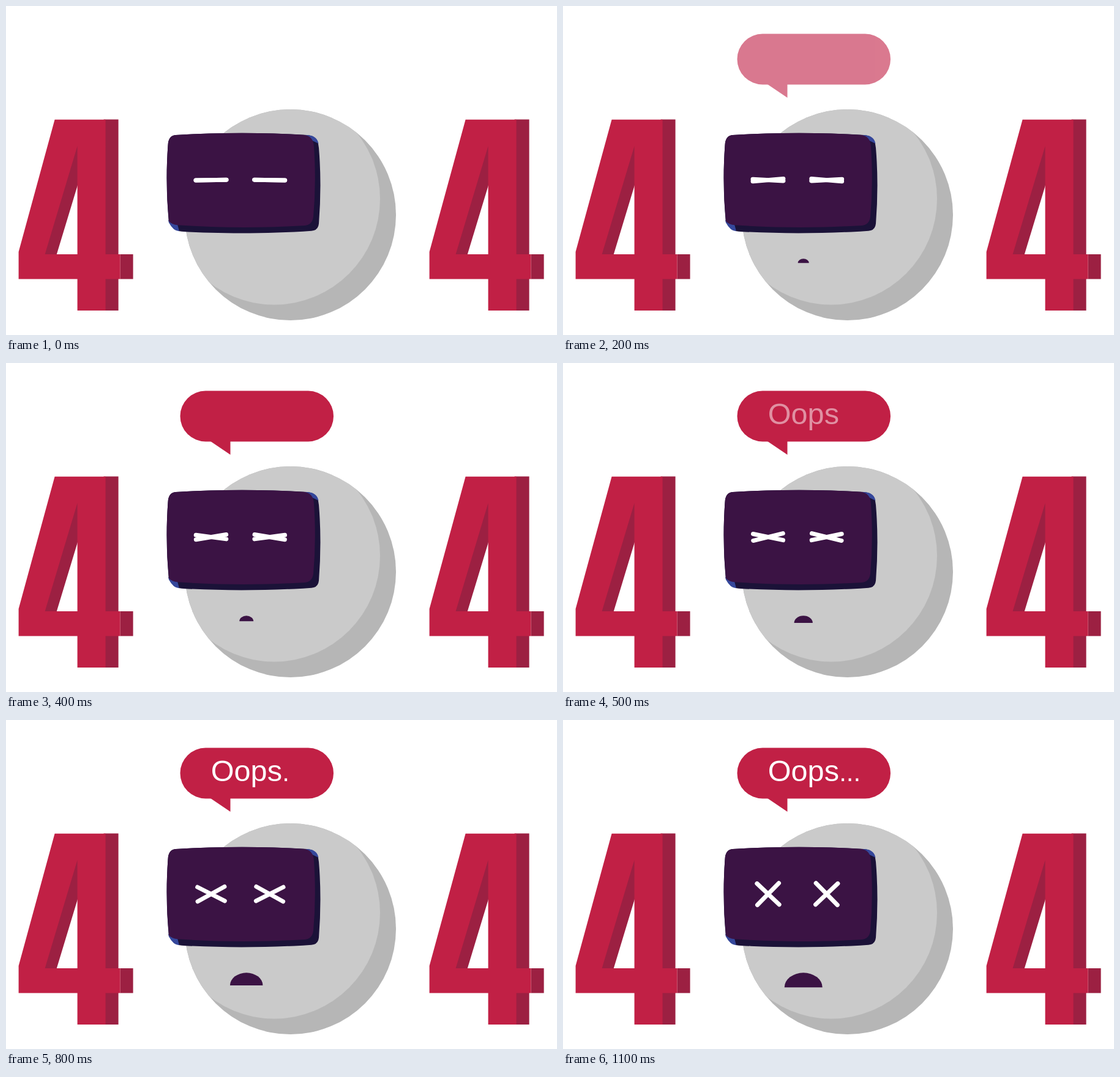
Recreate the animation shown at these times as an HTML page. Size 900 by 538 pixels, loop 2600 ms.

```html
<!DOCTYPE html>
<html lang="en">
<head>
<meta charset="utf-8">
<title>404</title>
<style>
  html, body { margin: 0; height: 100%; overflow: hidden; background: #fff; }
  svg { display: block; width: 100%; height: 100%; }
  text { font-family: "Liberation Sans", Arial, sans-serif; fill: #fff; }
  .red { fill: #c12045; }
  .dark-red { fill: #9c2042; }
  .ink { fill: #3b1344; }
  .blue { fill: #35479b; }
  .eye line { stroke: #fff; stroke-width: 7; stroke-linecap: round; }
</style>
</head>
<body>
<svg viewBox="0 0 900 538">
  <defs>
    <clipPath id="head"><circle cx="464.5" cy="341.5" r="172.5"/></clipPath>
    <g id="four">
      <path class="dark-red" d="M160 185.5H184V498H160ZM187 406H208V446.4H187ZM118 220V291L82 410H60Z"/>
      <path class="red" fill-rule="evenodd" d="M80 185.7H163V406H187V446.4H163V498H117V446.4H21V402Z M117 229V406H64Z"/>
    </g>
  </defs>

  <use href="#four" x="-0.4"/>
  <use href="#four" x="670.6"/>

  <circle cx="464.5" cy="341.5" r="172.5" fill="#b6b6b6"/>
  <circle cx="438" cy="315.5" r="173" fill="#cacaca" clip-path="url(#head)"/>

  <path fill="#1b1238" d="M264.5 228Q265 212 277 211C350 206.7 420 206.7 492 211Q510 212 511 232Q516 292 511 356Q510 367 499 367.7C430 372.5 350 372.5 287 368.7Q275 368 266 354Q260 290 264.5 228Z"/>
  <path class="blue" d="M484 211H492Q508 212 510.5 225L500 220ZM265 350L280 357L283 368.3Q273 368 266 354Z"/>
  <path class="ink" d="M264.5 228Q265 212 277 211C350 206.7 420 206.7 486 210.7Q502 212 503 230Q507 290 502 345Q500 358 488 359C420 363 350 363 280 358.3Q270 357 266 352Q260 290 264.5 228Z"/>

  <g class="eye" transform="translate(335 284.6) rotate(-1)"><line x1="-25" x2="25"/><line x1="-25" x2="25"/></g>
  <g class="eye" transform="translate(430.7 284.6) rotate(1)"><line x1="-25" x2="25"/><line x1="-25" x2="25"/></g>

  <path id="mouth" class="ink"/>

  <g id="bubble">
    <rect class="red" x="284.5" y="45.5" width="250.5" height="83" rx="41.5"/>
    <path class="red" d="M334 128L366.5 150V128Z"/>
  </g>
  <text id="word" x="334.8" y="99.8" font-size="48.6">Oops</text>
  <text id="dots" x="451.2" y="100.3" font-size="42"></text>
</svg>
<script>
  const LOOP = 2600, STEP = 100, LAST_STEP = 11;
  const byId = id => document.getElementById(id);
  const eyes = document.querySelectorAll('.eye');

  // Each key is [step, value].
  const bubbleKeys = [[0, 0], [2, 0.6], [3, 0.74], [4, 1]];
  const wordKeys = [[4, 0], [6, 1]];
  const angleKeys = [[0, 0], [2, 4], [3, 4.4], [4, 8.5], [6, 17], [8, 28], [11, 44.5]];
  const mouthKeys = [[3, 18], [4, 23], [6, 37.5], [8, 53.5], [9, 58], [10, 61], [11, 62]];

  function valueAt(keys, step) {
    const next = keys.findIndex(key => key[0] >= step);
    if (next < 0) return keys[keys.length - 1][1];
    if (next === 0) return keys[0][1];
    const [s0, v0] = keys[next - 1], [s1, v1] = keys[next];
    return v0 + (v1 - v0) * (step - s0) / (s1 - s0);
  }

  function dotCount(step) {
    return [8, 9, 11].filter(start => step >= start).length;
  }

  function mouthPath(step) {
    if (step === 0) return '';
    const width = valueAt(mouthKeys, step), rx = width / 2;
    const height = 7 + (width - 18) * 0.386;
    return `M${392.7 - rx} ${413.3 + height}a${rx} ${height} 0 0 1 ${width} 0Z`;
  }

  function draw() {
    const step = Math.min(LAST_STEP, Math.floor(performance.now() % LOOP / STEP));
    const angle = valueAt(angleKeys, step);
    for (const eye of eyes) {
      eye.children[0].setAttribute('transform', `rotate(${angle})`);
      eye.children[1].setAttribute('transform', `rotate(${-angle})`);
    }
    byId('mouth').setAttribute('d', mouthPath(step));
    byId('bubble').setAttribute('opacity', valueAt(bubbleKeys, step));
    byId('word').setAttribute('opacity', valueAt(wordKeys, step));
    byId('dots').textContent = '.'.repeat(dotCount(step));
    requestAnimationFrame(draw);
  }
  draw();
</script>
</body>
</html>
```
